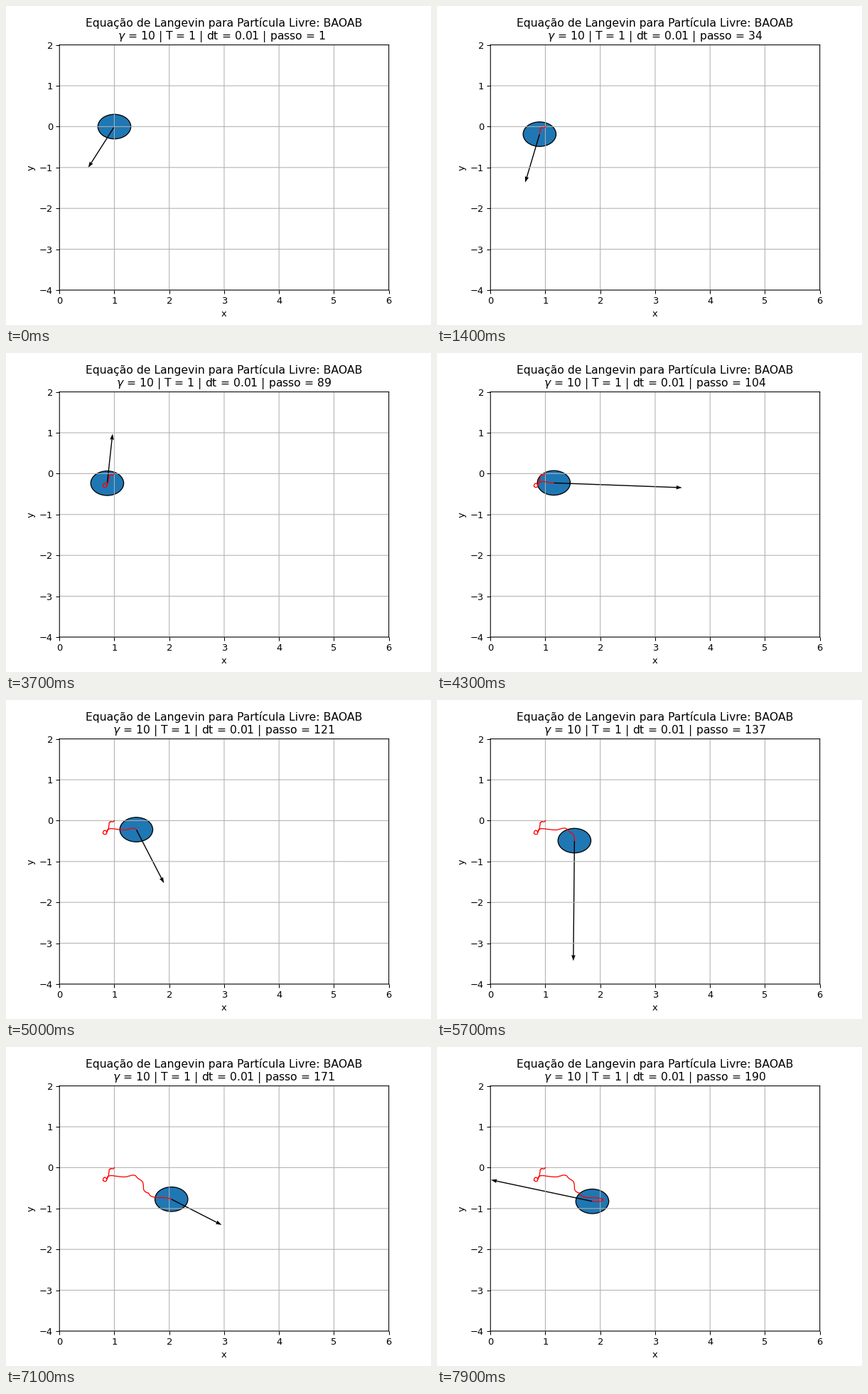
Animation, 598 px wide and 448 px high, one loop 8 s. Source, as a matplotlib script:

```python
import matplotlib.pyplot as plt
import numpy as np
from matplotlib.animation import FuncAnimation
from matplotlib.patches import Circle

DT, GAMMA = 0.01, 10
FRAMES, INTERVAL = 80, 100
HEAD = "Equação de Langevin para Partícula Livre: BAOAB"

# Key states of the particle: step, x, y, vx, vy
KEYS = np.array([
    (1, 1.0, 0.0, -0.47, -1.0),
    (20, 0.915, -0.035, -0.2, -0.1),
    (34, 0.895, -0.185, -0.25, -1.2),
    (46, 0.85, -0.33, -0.6, -0.3),
    (65, 0.80, -0.265, 0.34, 0.93),
    (89, 0.87, -0.235, 0.07, 1.2),
    (103, 1.13, -0.225, 2.4, -0.3),
    (121, 1.40, -0.22, 0.5, -1.3),
    (137, 1.53, -0.49, 0.0, -2.95),
    (154, 1.645, -0.675, 0.56, -1.67),
    (164, 1.90, -0.735, 3.2, -0.3),
    (190, 1.855, -0.825, -1.85, 0.51),
])


def jitter(n, rng):
    """Small Ornstein-Uhlenbeck wobble in x and y."""
    c = np.exp(-GAMMA * DT)
    w = np.zeros((n, 2))
    for i in range(1, n):
        w[i] = c * w[i - 1] + np.sqrt(1 - c * c) * rng.normal(size=2)
    return 0.008 * w


def walk(seed):
    """Positions and velocities: Hermite curve plus wobble between keys."""
    step, p, v = KEYS[:, 0], KEYS[:, 1:3], KEYS[:, 3:]
    s = np.arange(step[0], step[-1] + 1)
    i = np.clip(np.searchsorted(step, s, "right") - 1, 0, len(step) - 2)
    span = (step[i + 1] - step[i])[:, None]
    u = (s - step[i])[:, None] / span
    t = span * DT
    mean = (p[i + 1] - p[i]) / t
    a, b = v[i] - mean, v[i + 1] - mean
    pos = p[i] + t * (mean * u + u * (1 - u) * (a * (1 - u) - b * u))
    vel = mean + a * (1 - u) * (1 - 3 * u) - b * u * (2 - 3 * u)

    wobble = jitter(len(s), np.random.default_rng(seed))
    wobble *= np.sin(np.pi * u) ** 2
    return pos + wobble, vel + np.gradient(wobble, DT, axis=0)


pos, vel = walk(4)

plt.rcParams["path.snap"] = False
fig, ax = plt.subplots(figsize=(6.4, 4.79465), dpi=93.4375)
fig.subplots_adjust(left=80.5 / 640, right=576.5 / 640,
                    bottom=52.5 / 480, top=421.5 / 480)
ax.set(xlim=(0, 6), ylim=(-4, 2), xlabel="x", ylabel="y")
ax.grid(True)

ball = ax.add_patch(Circle(pos[0], 0.3, fc="tab:blue", ec="black"))
arrow = ax.quiver(*pos[0], *vel[0], angles="xy", scale_units="xy", scale=1,
                  width=0.003, headwidth=4, headlength=6, headaxislength=5.5)
trail, = ax.plot([], [], color="red", lw=1)
ax.annotate(HEAD, (0.5, 1), xycoords="axes fraction", xytext=(0, 20),
            textcoords="offset points", ha="center", fontsize=12)
title = ax.set_title("")


def update(frame):
    step = 1 + 12 * frame // 5
    i = step - 1
    ball.center = pos[i]
    arrow.set_offsets([pos[i]])
    arrow.set_UVC(*vel[i])
    trail.set_data(*pos[:step].T)
    title.set_text(rf"$\gamma$ = {GAMMA} | T = 1 | dt = {DT} | "
                   f"passo = {step:<3}")
    return ball, arrow, trail, title


anim = FuncAnimation(fig, update, frames=FRAMES, interval=INTERVAL,
                     repeat=True, repeat_delay=0, blit=False)
plt.show()
```
